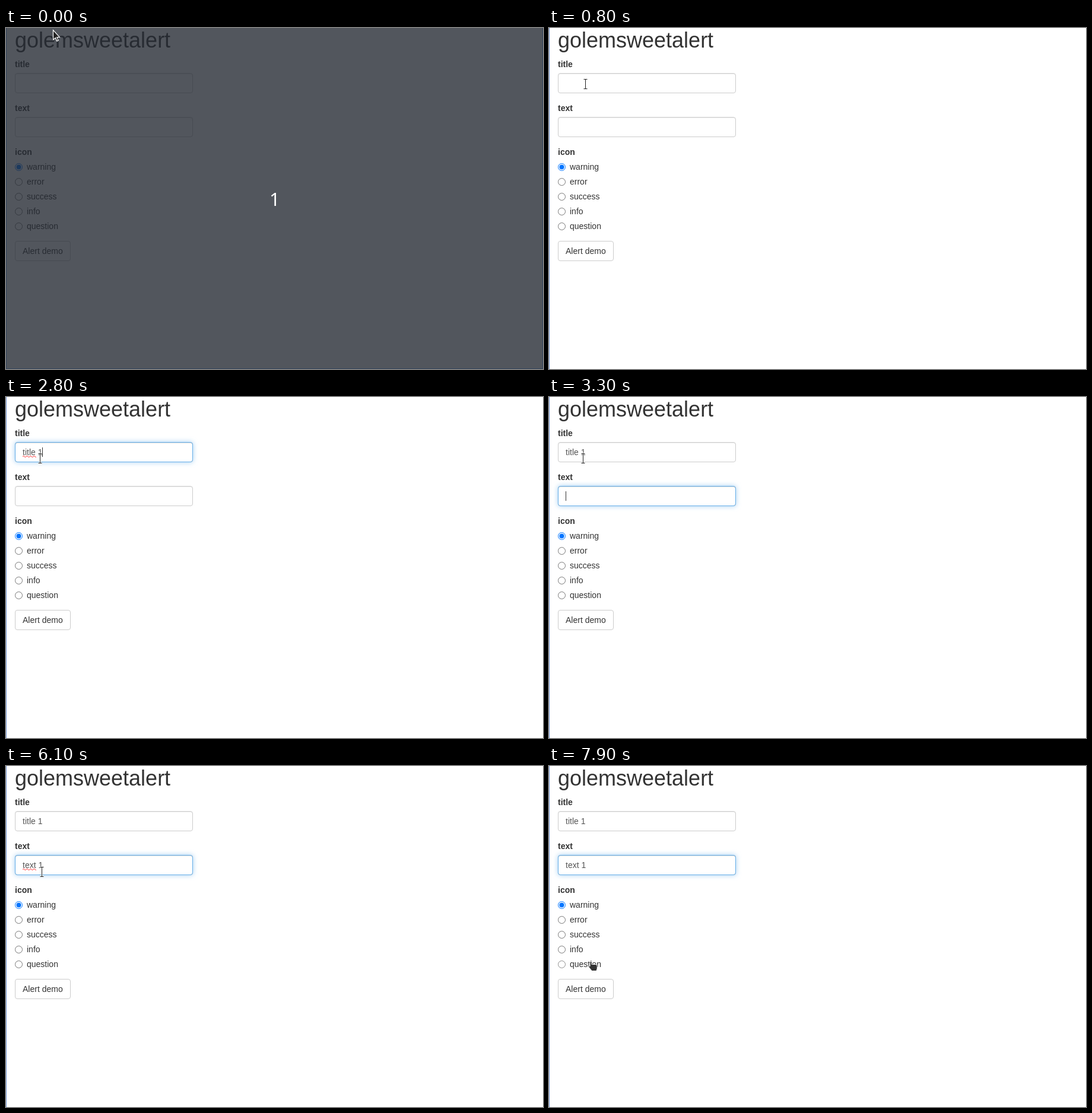
Write an HTML page that moves like this. It is 905 by 575 pixels and loops after 8000 ms.

```html
<!DOCTYPE html>
<html lang="en">
<head>
<meta charset="utf-8">
<style>
  html, body { margin: 0; width: 100%; height: 100%; overflow: hidden; background: #fff; }
  body { position: relative; font: 14px/20px "Liberation Sans", Arial, sans-serif; color: #333; }
  body *, svg { position: absolute; box-sizing: border-box; white-space: pre; }
  svg, svg * { position: static; }
  svg { position: absolute; left: 0; top: 0; overflow: visible; }
  h1 { margin: 0; left: 15px; top: 1px; font-size: 36px; font-weight: 400; line-height: 39.6px; }
  b, .field, .button { left: 15px; }
  .field { width: 300px; height: 34px; border: 1px solid #ccc; border-radius: 4px; color: #555;
    box-shadow: inset 0 1px 1px rgba(0,0,0,.075); }
  .glow { inset: -1px; border: 1px solid #66afe9; border-radius: 4px;
    box-shadow: inset 0 1px 1px rgba(0,0,0,.075), 0 0 8px rgba(102,175,233,.6); }
  .value { left: 12px; top: 6px; }
  .caret { top: 8px; width: 1px; height: 16px; background: #333; }
  .field svg { left: 12px; top: 21px; overflow: hidden; }
  .button { top: 359px; width: 94px; height: 34px; border: 1px solid #ccc; border-radius: 4px; padding: 6px 12px; }
  .edge { left: 0; top: 0; width: 1px; height: 575px; background: #7b9fdc; }
  #veil { left: 0; top: 0; width: 905px; height: 575px; background: rgba(36,41,50,.79);
    border: solid #32435c; border-width: 0 1px 1px; }
  #count { left: 443px; top: 268px; font: 31px/40px "Noto Sans", "Open Sans", sans-serif; color: #fff; }
</style>
</head>
<body>
<h1>golemsweetalert</h1>
<b style="top:51px">title</b>
<b style="top:125px">text</b>
<b style="top:199px">icon</b>
<div id="options"></div>
<div class="button">Alert demo</div>
<div class="edge"></div>
<div id="veil"><span id="count">1</span></div>
<svg id="pointer" width="905" height="575">
  <g id="arrow" fill="#222" stroke="#fff" stroke-width="1.2">
    <path d="M.5 .5V17l3.8-3.5 2.5 5.6 2.5-1.1-2.5-5.4h4.7z"/>
  </g>
  <g id="beam" fill="none">
    <path d="M-2.5-7.5h6M.5-7.5v16M-2.5 8.5h6" stroke="#fff" stroke-width="2.6"/>
    <path d="M-2.5-7.5h6M.5-7.5v16M-2.5 8.5h6" stroke="#222"/>
  </g>
  <g id="hand" fill="#333" stroke="#fff" stroke-width="1.6" paint-order="stroke">
    <path d="M-1.5 .5q1-1.5 2.2 0V5h6.5q2.6 .2 2.6 2.8v3.2q0 1.5-1 3V15h-7.5q-3-3.5-5-6.2q0-1.8 1.8-1l.4 .6z"/>
  </g>
</svg>
<script>
const LOOP = 8000;
const byId = id => document.getElementById(id);

// Each row: time, then the value that holds from that time on.
const pointerPath = [
  [0, 79, 3], [100, 79, 4], [300, 79, 7], [400, 77, 20], [500, 72, 43], [600, 66, 66],
  [700, 62, 84], [800, 61, 94], [900, 61, 98], [1300, 57, 103],
  [5900, 58, 106], [6000, 59, 135], [6100, 60, 178], [6200, 64, 215], [6300, 71, 246], [6400, 74, 269],
  [6700, 76, 271], [6800, 78, 273], [6900, 79, 274],
  [7300, 78, 284], [7400, 75, 305], [7500, 73, 325], [7700, 72, 327], [7800, 71, 330]
];
const titleKeys = [1700, 1900, 2000, 2100, 2200, 2300, 2800];
const textKeys = [3700, 3900, 4400, 4700, 4800, 5100];

const within = (v, from, to) => v >= from && v < to;
const typed = (text, keys, t) => text.slice(0, keys.filter(k => k <= t).length);
const show = (el, on) => el.style.display = on ? "" : "none";

function makeField(top) {
  const field = document.createElement("div");
  field.className = "field";
  field.style.top = top + "px";
  field.innerHTML = `<div class="glow"></div><span class="value"></span><i class="caret"></i>
    <svg width="23" height="4"><path d="M0 2.5q1.5-2.4 3 0${"t3 0".repeat(8)}" fill="none" stroke="#f22"/></svg>`;
  document.body.insertBefore(field, byId("options"));
  const [glow, value, caret, squiggle] = field.children;
  return (text, focus, caretOn, misspelt) => {
    value.textContent = text;
    glow.style.opacity = focus;
    caret.style.left = Math.floor(12 + value.getBoundingClientRect().width) + "px";
    show(caret, caretOn);
    show(squiggle, misspelt);
  };
}

const rings = ["warning", "error", "success", "info", "question"].map((name, i) => {
  const top = 224 + 25 * i;
  const dot = i ? "" : '<circle cx="6.5" cy="6.5" r="4" fill="#0075ff"/>';
  byId("options").insertAdjacentHTML("beforeend",
    `<svg width="13" height="13" style="left:15px;top:${top + 4}px">
      <circle class="ring" cx="6.5" cy="6.5" r="6" fill="#fff"/>${dot}</svg>
     <span style="left:35px;top:${top}px">${name}</span>`);
  return byId("options").querySelectorAll(".ring")[i];
});

const drawTitle = makeField(76);
const drawText = makeField(150);

function drawPointer(t) {
  const [, x, y] = pointerPath.filter(p => p[0] <= t).pop();
  const overRow = within(y, 224, 344) && (y - 224) % 25 < 20;
  const overText = y < 38 || within(y, 76, 110) || within(y, 150, 184);
  const shape = t < 100 ? "arrow" : overRow ? "hand" : overText ? "beam" : "arrow";
  for (const id of ["arrow", "beam", "hand"]) show(byId(id), id === shape);
  byId(shape).setAttribute("transform", `translate(${x} ${y})`);

  const hovered = overRow ? Math.floor((y - 224) / 25) : -1;
  rings.forEach((ring, i) => {
    const active = i === hovered;
    const grey = active ? (t >= 7900 ? "#8d8d8d" : "#4f4f4f") : "#767676";
    ring.setAttribute("stroke", i ? grey : "#0075ff");
  });
}

function draw(t) {
  show(byId("veil"), t < 100);

  const titleFocus = t < 900 ? 0 : t < 1000 ? .5 : t < 3100 ? 1 : t < 3200 ? .7 : t < 3300 ? .2 : 0;
  const titleCaret = within(t, 1000, 1600) || within(t, 1700, 3100);
  drawTitle(typed("title 1", titleKeys, t), titleFocus, titleCaret, within(t, 2400, 3100));

  const textFocus = t < 3100 ? 0 : t < 3200 ? .3 : t < 3300 ? .8 : 1;
  const textCaret = within(t, 3100, 5600) || within(t, 6200, 6700) || within(t, 7200, 7700);
  drawText(typed("text 1", textKeys, t), textFocus, textCaret, within(t, 4800, 7900));

  drawPointer(t);
}

const start = performance.now();
function tick() {
  draw((performance.now() - start) % LOOP);
  requestAnimationFrame(tick);
}
tick();
</script>
</body>
</html>
```
